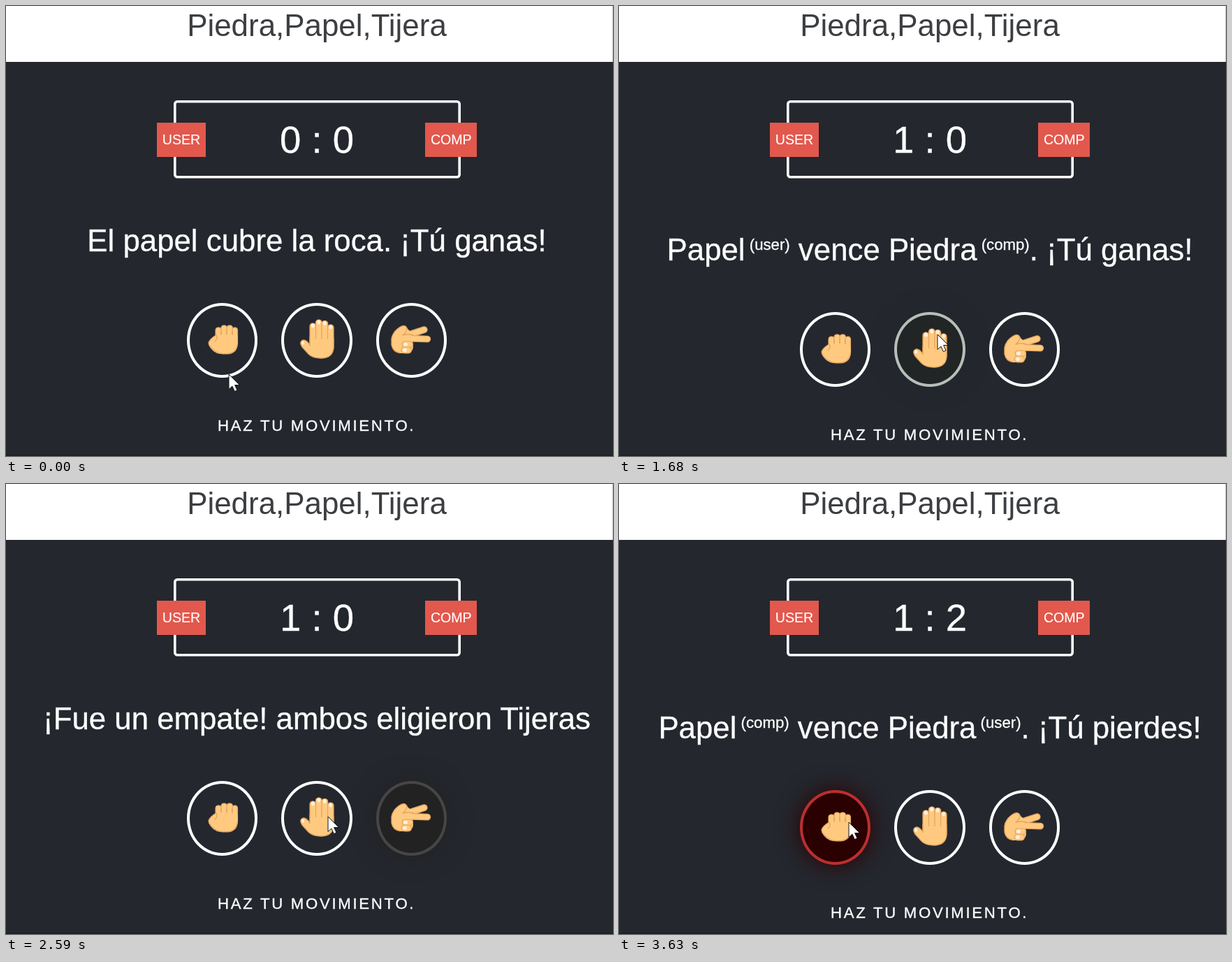
Recreate the animation shown at these times as an HTML page. Size 869 by 644 pixels, loop 3700 ms.

```html
<!DOCTYPE html>
<html lang="es">
<head>
<meta charset="utf-8">
<title>Piedra, Papel, Tijera</title>
<style>
:root {
  --loop: 3700ms;
  --dark: #24272e;
  --none: 0 0 34px #24272e00;
}
html, body { margin: 0; width: 100%; height: 100%; overflow: hidden; background: var(--dark); }
.stage { position: relative; width: 869px; height: 644px; overflow: hidden; }
.stage > svg { position: absolute; left: 0; top: 0; }
text {
  font-family: "Liberation Sans", Arial, sans-serif;
  fill: #fff; stroke: #fff; stroke-width: .35px;
  text-anchor: middle; white-space: pre;
}
.title { font-size: 43.9px; fill: #3c3e42; stroke: none; }
.badge { font-size: 19.6px; stroke-width: .15px; }
.score text { font-size: 54.5px; }
.message text { font-size: 43.8px; }
.message .sup { font-size: 22.2px; }
.hint { font-size: 22.2px; letter-spacing: 2.7px; text-anchor: start; }

/* Hard switches */
.score text, .message text, .spot { opacity: 0; animation: var(--loop) step-end infinite; }
.score .s1 { animation-name: s1 }
.score .s2 { animation-name: s2 }
.message .m1 { animation-name: m1 }
.message .m2 { animation-name: m2 }
.message .m3 { animation-name: m3 }
.message .m4 { animation-name: m4 }
.message .m5, .score .s3 { animation-name: m5 }
.message .m6, .score .s4 { animation-name: m6 }
.spot { animation-name: spot }
.shift { animation: shift var(--loop) step-end infinite; }
@keyframes s1 { 0% { opacity: 1 } 43.51%, 100% { opacity: 0 } }
@keyframes s2 { 0% { opacity: 0 } 43.51% { opacity: 1 } 71.89%, 100% { opacity: 0 } }
@keyframes m1 { 0% { opacity: 1 } 16.21%, 100% { opacity: 0 } }
@keyframes m2 { 0% { opacity: 0 } 16.21% { opacity: 1 } 43.51%, 100% { opacity: 0 } }
@keyframes m3 { 0% { opacity: 0 } 43.51% { opacity: 1 } 62.43%, 100% { opacity: 0 } }
@keyframes m4 { 0% { opacity: 0 } 62.43% { opacity: 1 } 71.89%, 100% { opacity: 0 } }
@keyframes m5 { 0% { opacity: 0 } 71.89% { opacity: 1 } 90.54%, 100% { opacity: 0 } }
@keyframes m6 { 0% { opacity: 0 } 90.54%, 100% { opacity: 1 } }
@keyframes spot {
  0%, 16.21%, 43.51%, 62.43%, 90.54%, 100% { opacity: 0 }
  14.32%, 41.62%, 60.54%, 88.64% { opacity: .52 }
}
@keyframes shift {
  0%, 62.43% { transform: translateY(0) }
  43.51%, 71.89%, 100% { transform: translateY(13px) }
}

/* Choice buttons and their glow */
.choices { position: absolute; left: 0; top: 0; }
.ring {
  position: absolute; top: 425.4px; width: 101.5px; height: 106.8px; box-sizing: border-box;
  border: 4px solid #fff; border-radius: 50%; animation: var(--loop) ease infinite;
}
.ring svg { position: absolute; left: 50%; top: 50%; width: 1px; height: 1px; overflow: visible; }
.rock { left: 258.8px; animation-name: rock }
.paper { left: 394.2px; animation-name: paper }
.scissors { left: 529.6px; animation-name: scissors }
@keyframes rock {
  0%, 15.1%, 36.1%, 90% { border-color: #fff; background: #24272e00; box-shadow: var(--none) }
  23.2%, 28% { border-color: #464646; background: #222; box-shadow: 0 0 34px #222 }
  97.8%, 100% { border-color: #bd2e2e; background: #2a0001; box-shadow: 0 0 34px #2a0001 }
}
@keyframes paper {
  0%, 43.1%, 64.9%, 72.1%, 93.8%, 100% { border-color: #fff; background: #24272e00; box-shadow: var(--none) }
  51.2%, 56.8% { border-color: #6b7b6e; background: #1f2620; box-shadow: 0 0 34px #22262a }
  80.2%, 85.7% { border-color: #bd2e2e; background: #2a0001; box-shadow: 0 0 34px #2a0001 }
}
@keyframes scissors {
  0%, 62%, 83.6%, 100% { border-color: #fff; background: #24272e00; box-shadow: var(--none) }
  69.7%, 75.5% { border-color: #464646; background: #222; box-shadow: 0 0 34px #222 }
}
.skin { fill: #ffca80; }
.finger { fill: #ffca80; stroke: #e3a660; stroke-width: 1.2; }
.crease { fill: none; stroke: #e3a660; stroke-width: 1.4; stroke-linecap: round; }
.nail { fill: #fff0df; }

/* Pointer */
.pointer { animation: pointer var(--loop) linear infinite; }
@keyframes pointer {
  0%, 1% { transform: translate(319px, 527px) }
  5.4%, 19.7% { transform: translate(318px, 497px) }
  28.4%, 51.1% { transform: translate(456px, 470px) }
  54.8% { transform: translate(558px, 498px) }
  59.5%, 64.3% { transform: translate(572px, 482px) }
  69.9%, 77.6% { transform: translate(461px, 476px) }
  87.6%, 100% { transform: translate(329px, 484px) }
}
</style>
</head>
<body>
<div class="stage">
  <svg width="869" height="644">
    <rect width="869" height="644" fill="#24272e"/>
    <rect width="869" height="80" fill="#fff"/>
    <rect x="868" width="1" height="80" fill="#c4c4c4"/>
    <rect y="642" width="869" height="2" fill="#1d1f24"/>
    <text class="title" x="445" y="42.5">Piedra,Papel,Tijera</text>

    <rect x="241.8" y="136.8" width="407.4" height="107.9" rx="3.5" fill="none" stroke="#fff" stroke-width="3.6"/>
    <rect x="216" y="167" width="70" height="49" fill="#e2584d"/>
    <rect x="600" y="167" width="74" height="49" fill="#e2584d"/>
    <text class="badge" x="251" y="198">USER</text>
    <text class="badge" x="637.3" y="198">COMP</text>

    <g class="score">
      <text class="s1" x="445" y="210">0 : 0</text>
      <text class="s2" x="445" y="210">1 : 0</text>
      <text class="s3" x="445" y="210">1 : 1</text>
      <text class="s4" x="445" y="210">1 : 2</text>
    </g>

    <g class="message">
      <text class="m1" x="445" y="351">El papel cubre la roca. ¡Tú ganas!</text>
      <text class="m2" x="445" y="351">¡Fue un empate! ambos eligieron Piedra</text>
      <text class="m3" x="445" y="364">Papel<tspan class="sup" dy="-15"> (user)</tspan><tspan dy="15"> vence Piedra</tspan><tspan class="sup" dy="-15"> (comp)</tspan><tspan dy="15">. ¡Tú ganas!</tspan></text>
      <text class="m4" x="445" y="351">¡Fue un empate! ambos eligieron Tijeras</text>
      <text class="m5" x="445" y="364">Tijeras<tspan class="sup" dy="-15"> (comp)</tspan><tspan dy="15"> vence Papel</tspan><tspan class="sup" dy="-15"> (user)</tspan><tspan dy="15">. ¡Tú pierdes!</tspan></text>
      <text class="m6" x="445" y="364">Papel<tspan class="sup" dy="-15"> (comp)</tspan><tspan dy="15"> vence Piedra</tspan><tspan class="sup" dy="-15"> (user)</tspan><tspan dy="15">. ¡Tú pierdes!</tspan></text>
    </g>

    <g class="shift"><text class="hint" x="303" y="607.7">HAZ TU MOVIMIENTO.</text></g>
  </svg>

  <div class="choices shift">
    <div class="ring rock">
      <svg>
        <g class="finger">
          <rect x="-10" y="-19" width="8.5" height="24" rx="4"/>
          <rect x="-2" y="-22" width="8.5" height="26" rx="4"/>
          <rect x="6" y="-22" width="8.5" height="26" rx="4"/>
          <rect x="14" y="-19" width="7.5" height="26" rx="3.7"/>
        </g>
        <path class="skin" d="M-10-8Q6-12 21.5-6V5Q21 19 6 19H-3Q-14 18-20 6Q-21 0-10-8Z"/>
        <path class="crease" d="M-9-8Q-18-3-20 3Q-19 9-12 14Q-7 18 0 18.7H7Q19 18 21.3 6M-9-8Q-6-3-11 1M-1.8-9V-14M6.2-9V-14M14-9V-14"/>
      </svg>
    </div>
    <div class="ring paper">
      <svg>
        <g class="finger">
          <rect x="-10" y="-25" width="8.7" height="38" rx="4.2"/>
          <rect x="-1.5" y="-30" width="8.7" height="42" rx="4.2"/>
          <rect x="7" y="-28.5" width="8.7" height="42" rx="4.2"/>
          <rect x="15.5" y="-23" width="8.5" height="36" rx="4.2"/>
        </g>
        <path class="skin" d="M-10-2H24V10Q23 25 8 25Q-5 26-12 19L-22 8Q-26 1-19-1Q-14 0-10 6Z"/>
        <path class="crease" d="M-10-5V6Q-15-1-19-1Q-26 1-21 9L-12 19Q-6 25 7 25Q23 24 24 10V-4"/>
        <g class="nail">
          <ellipse cx="-5.6" cy="-21.5" rx="2.5" ry="3"/>
          <ellipse cx="2.8" cy="-26.5" rx="2.5" ry="3"/>
          <ellipse cx="11.3" cy="-25" rx="2.5" ry="3"/>
          <ellipse cx="19.7" cy="-19.5" rx="2.3" ry="3"/>
          <ellipse cx="-20" cy="3" rx="2" ry="2.8"/>
        </g>
      </svg>
    </div>
    <div class="ring scissors">
      <svg>
        <g class="finger">
          <rect x="-10" y="-13.5" width="37" height="8.6" rx="4.3" transform="rotate(-18)"/>
          <rect x="-8" y="-7.5" width="35.5" height="8.6" rx="4.3" transform="rotate(2)"/>
        </g>
        <path class="skin" d="M-28-6Q-24-16-15-20Q-8-24-5-17L0-12L2 0L3 9Q2 17-6 18H-16Q-27 16-28 5Z"/>
        <path class="crease" d="M-28-3Q-25-14-16-19.5Q-8-24-6-17Q-6-13-12-8M-28-3V6Q-26 16-16 17.5M-12-8Q-3-10 3-8"/>
        <g class="finger">
          <rect x="-13" y="1" width="15.5" height="8.5" rx="4.2"/>
          <rect x="-14" y="9" width="14.5" height="8.8" rx="4.2"/>
        </g>
        <g class="nail">
          <ellipse cx="-8" cy="5.2" rx="3" ry="2.7"/>
          <ellipse cx="-9" cy="13.5" rx="3" ry="2.7"/>
        </g>
      </svg>
    </div>
  </div>

  <svg width="869" height="644">
    <g class="pointer">
      <path d="M0 0V21.5L4.9 17L8.4 24.6L12 23L8.6 15.5H15.5Z" fill="#fff" stroke="#15161a"/>
      <circle class="spot" cx="-.5" r="17" fill="#fff000"/>
    </g>
  </svg>
</div>
</body>
</html>
```
